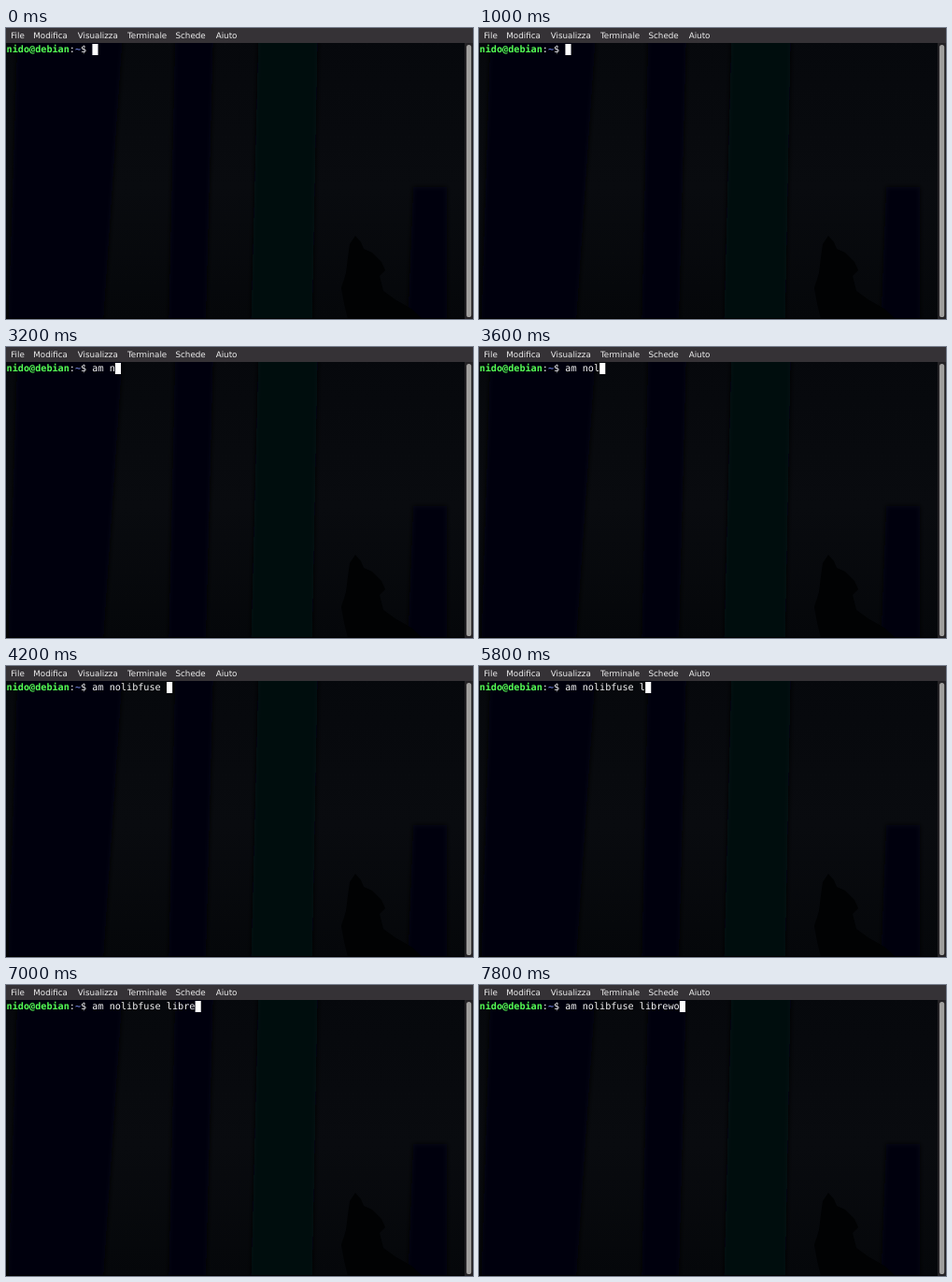
Animation, 500 px wide and 311 px high, one loop 8 s. Source, as an HTML page:

```html
<!DOCTYPE html>
<html lang="it">
<head>
<meta charset="utf-8">
<title>Terminale</title>
<style>
html, body { margin: 0; width: 100%; height: 100%; overflow: hidden; background: #040609; }
svg { display: block; }
text { white-space: pre; text-rendering: geometricPrecision; }
.menu { font: 8.75px "DejaVu Sans", sans-serif; fill: #eee; }
.shell { font: 10.17px "DejaVu Sans Mono", monospace; fill: #f4f4f4; }
.bold { font-weight: bold; }
</style>
</head>
<body>
<svg width="500" height="311" viewBox="0 0 500 311">
  <defs>
    <linearGradient id="sky" x2="0" y2="1">
      <stop offset="0" stop-color="#06080c"/>
      <stop offset=".55" stop-color="#090b0f"/>
      <stop offset="1" stop-color="#05070a"/>
    </linearGradient>
    <filter id="soft"><feGaussianBlur stdDeviation="2.5"/></filter>
  </defs>

  <!-- dark forest -->
  <rect width="500" height="311" fill="url(#sky)"/>
  <g filter="url(#soft)">
    <path d="M12 10H125L104 320H2Z" fill="#020408"/>
    <path d="M181 10H222L214 320H174Z" fill="#04060a"/>
    <path d="M270 10H334L328 320H262Z" fill="#05070a"/>
    <path d="M436 170H472V320H430Z" fill="#04060a"/>
  </g>

  <!-- howling animal -->
  <path d="M374 222L380 229 383 236 392 240 402 250 406 259 400 265 404 281 418 291 434 300 446 311H366L362 294 359 278 364 262 366 246 368 231Z" fill="#010203"/>

  <rect y="310" width="491" height="1" fill="#010101"/>

  <!-- scrollbar -->
  <rect x="491" y="16" width="9" height="295" fill="#242225"/>
  <rect x="493" y="18" width="5.2" height="291" rx="2.6" fill="#a09f9d"/>

  <!-- menu bar -->
  <rect width="500" height="16" fill="#353236"/>
  <g class="menu">
    <text x="5.2" y="11">File</text>
    <text x="29.3" y="11">Modifica</text>
    <text x="76.7" y="11">Visualizza</text>
    <text x="129.9" y="11">Terminale</text>
    <text x="181.5" y="11">Schede</text>
    <text x="224.7" y="11">Aiuto</text>
  </g>

  <text class="shell" x=".6" y="26.3"><tspan class="bold" fill="#5f5">nido@debian</tspan>:<tspan class="bold" fill="#6a7ad0">~</tspan>$ <tspan id="typed"></tspan></text>
  <rect id="cursor" y="17" width="6.1" height="12" fill="#fff"/>
</svg>
<script>
const LOOP = 8000, CHAR = 6.122, LEFT = 0.6, PROMPT = 15;
const line = "am nolibfuse librewo";
// [time in ms, characters on the line]; the jump at 4200 is a completion
const keys = [
  [0, 0], [1600, 1], [1800, 2], [2600, 3], [3200, 4], [3400, 5], [3600, 6], [3800, 7],
  [4200, 13], [5800, 14], [6000, 15], [6200, 16], [6400, 17], [7000, 18], [7600, 19], [7800, 20]
];
const typed = document.getElementById("typed");
const cursor = document.getElementById("cursor");

function draw() {
  const t = performance.now() % LOOP;
  const count = keys.filter(([at]) => at <= t).pop()[1];
  typed.textContent = line.slice(0, count);
  cursor.setAttribute("x", LEFT + (PROMPT + count) * CHAR);
  requestAnimationFrame(draw);
}
draw();
</script>
</body>
</html>
```
